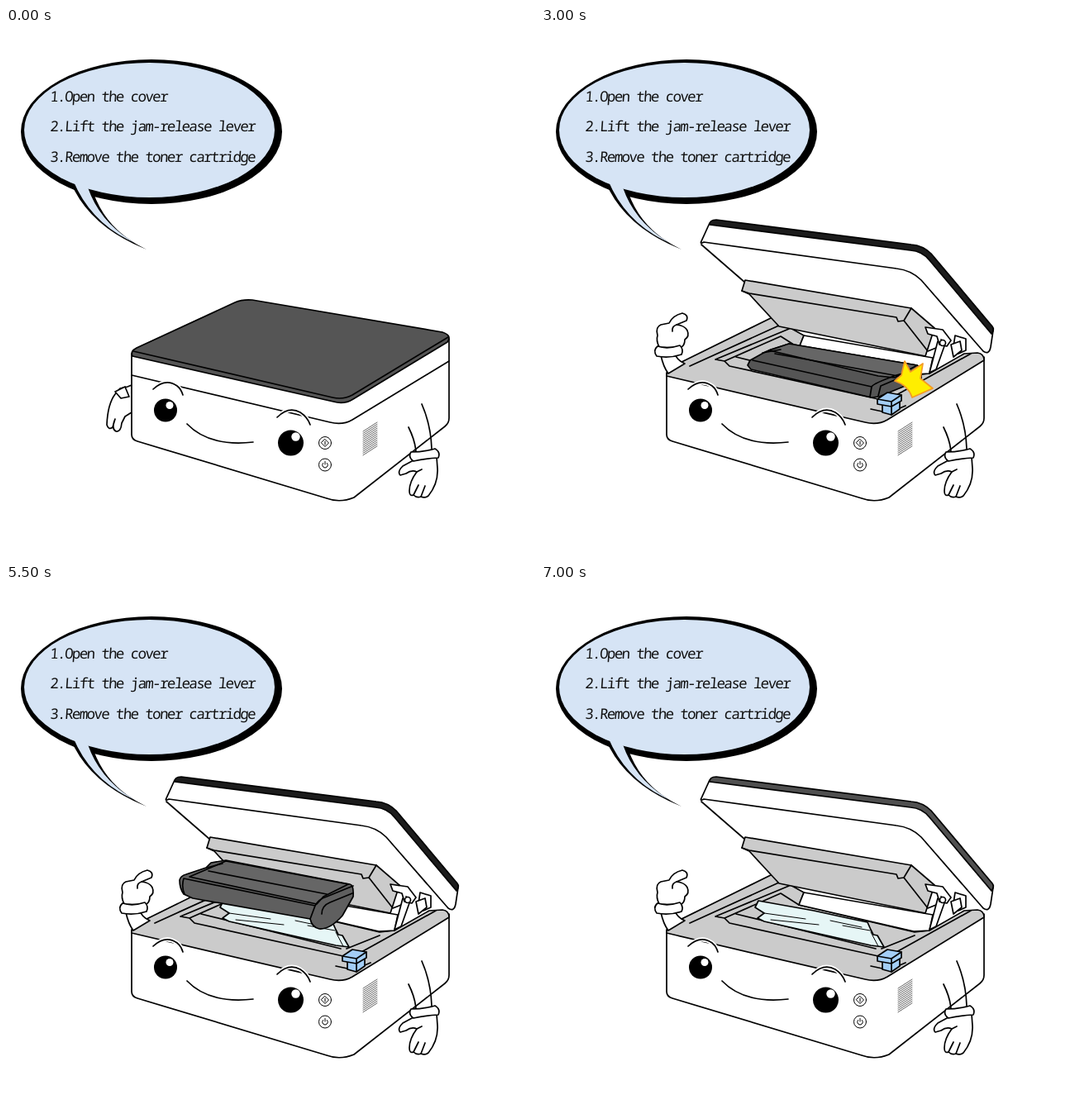
Recreate the animation shown at these times as an HTML page. Size 640 px wide and 640 px high, loop 9 s.

```html
<!DOCTYPE html>
<html lang="en">
<head>
<meta charset="utf-8">
<title>Remove the toner cartridge</title>
<style>
  html, body { margin: 0; width: 100%; height: 100%; overflow: hidden; background: #fff; }
  svg { display: block; width: 100vw; height: 100vh; }
  path, circle, ellipse { fill: none; stroke: #000; stroke-width: 1.7; stroke-linejoin: round; stroke-linecap: round; }
  .white { fill: #fff; }
  .grey { fill: #cbcbcb; }
  .dark { fill: #555; }
  .side { fill: #5f5f5f; }
  .top { fill: #666; }
  .blue { fill: #a3cef7; }
  .ink { fill: #000; stroke: none; }
  .sky { fill: #d6e4f5; stroke: none; }
  .paper { fill: #e6f6f6; }
  .thin { stroke-width: 1; }
  .halo { stroke: #fff; stroke-width: 5; }
  .glint { fill: #fff; stroke: none; }
  #vents { stroke: #555; stroke-width: .9; }
  text { font: 300 17.5px "Noto Sans Mono", "DejaVu Sans Mono", monospace; letter-spacing: -1.65px; fill: #111; }
</style>
</head>
<body>
<svg viewBox="0 0 640 640">
  <g id="bubble">
    <ellipse class="ink" cx="176" cy="125.5" rx="158" ry="87.5"/>
    <path class="ink" d="M78 186Q100 240 170 268Q122 245 106 200Z"/>
    <ellipse class="sky" cx="173.5" cy="123.5" rx="151.5" ry="81.5"/>
    <path class="sky" d="M81 184Q103 237 156 260Q114 236 99 193Z"/>
    <g id="steps"></g>
  </g>

  <g id="closed">
    <path class="white" d="M152 432L147 434L138 436L132 443Q123 455 122 480Q124 487 129 483L132 473Q127 485 133 488Q139 489 140 478L144 470L152 465Z"/>
    <path class="white" d="M132 440L144 434L149 446L139 448Z"/>
    <path class="white" d="M152 394V492Q152 498 159 500L388 569Q404 575 421 568L531 482Q536 478 536 472V376L416 449L400 450Z"/>
    <path class="dark" d="M153 397Q150 391 158 387L277 332Q286 328 298 329L528 368Q540 372 534 380L420 449Q409 456 396 452Z"/>
    <path d="M154 391L395 447Q408 450 419 444L535 374"/>
    <path d="M152 420L392 477Q407 481 419 474L536 403"/>
  </g>

  <g id="open">
    <path class="white" d="M152 417V492Q152 498 159 500L388 569Q404 575 421 568L531 482Q536 478 536 472V398L416 474Z"/>
    <path class="grey" d="M152 421Q151 414 160 409L282 349L300 362L318 372L312 387L452 420L470 418L512 394L528 393Q536 394 536 402L419 474Q407 481 392 477Z"/>
    <path d="M180 409L290 359M211 401L300 364M211 401L222 403L228 409L408 449M222 403L290 373L312 387M236 398L405 440M412 440L452 424M430 444L520 394"/>
    <path class="white" d="M318 372L312 387L451 419L470 418L474 399Z"/>

    <path class="white" d="M204 236L194 258Q192 262 197 259L430 291Q448 293 460 305L535 391Q542 396 544 386L547 366L468 274L450 267Z"/>
    <path id="strip" d="M204 238Q204 232 212 232L448 262Q462 263 472 273L546 361Q549 365 545 370L470 281Q461 270 447 269Z"/>
    <path d="M194 262L247 308"/>
    <path class="grey" d="M247 305L448 339L476 363L465 397L288 361L252 322L243 318Z"/>
    <path d="M243 318L252 321L430 350L432 355L439 354L468 391L478 387M439 354L448 339"/>

    <path class="white" d="M480 379L470 417L478 413L489 382Z"/>
    <path class="white" d="M465 362L486 365L496 378L491 385L482 383L479 373L468 370Z"/>
    <path class="white" d="M499 385L501 372L514 376V390L505 394Z"/>
    <path class="white" d="M496 383L507 379L509 390L499 398Z"/>
    <path d="M484 377L489 380"/>
    <circle class="white" cx="486" cy="381" r="3.5"/>

    <path class="white" d="M145 396Q148 410 154 418L174 406Q164 402 161 392"/>
    <path class="white" d="M143 386Q139 378 141 372Q138 362 145 359L155 357Q159 348 171 345Q179 347 176 354L164 359Q174 360 177 366Q180 373 174 377Q174 385 168 387Z"/>
    <path d="M164 359Q158 361 159 367"/>
    <path class="white" d="M141 385Q153 389 168 384Q173 389 170 395Q155 400 140 397Q135 390 141 385Z"/>
  </g>

  <g id="face">
    <path class="halo" d="M178 437Q193 423 207 433Q212 437 214 444"/>
    <path d="M178 437Q193 423 207 433Q212 437 214 444"/>
    <path class="halo" d="M328 471Q342 457 356 465Q365 471 368 480"/>
    <path d="M328 471Q342 457 356 465Q365 471 368 480"/>
    <circle class="ink" cx="193" cy="462.5" r="14"/>
    <circle class="glint" cx="198" cy="456.5" r="4.5"/>
    <circle class="ink" cx="344.5" cy="502" r="15.5"/>
    <circle class="glint" cx="350.5" cy="494.5" r="5.2"/>
    <path d="M219 479Q246 507 299 501"/>
    <g id="buttons">
      <circle class="thin" cx="386" cy="502" r="7.5"/>
      <path class="thin" d="M386 497.5L390.5 502L386 506.5L381.5 502ZM386 500V504"/>
      <circle class="thin" cx="386" cy="528.5" r="7.5"/>
      <path class="thin" d="M383.5 526.5A3.3 3.3 0 1 0 388.5 526.5M386 524.5V528"/>
    </g>
    <path id="vents"/>
  </g>

  <g id="right-arm">
    <path d="M503 455Q514 480 515 509M487 483Q495 499 496 513"/>
    <path class="white" d="M493 523L480 530Q473 537 477 541L484 539Q491 534 497 537Q488 549 488 560Q488 567 493 565Q497 569 502 567Q507 569 511 566Q523 551 522 533L521 519Z"/>
    <path d="M499 553L493 565M507 554L502 567M497 537L503 534"/>
    <path class="white" d="M490 513Q505 513 519 509Q526 513 523 520Q507 521 493 524Q486 519 490 513Z"/>
  </g>

  <g id="seated">
    <path class="dark" d="M250 408L253 402L271 392L278 389L300 382L455 408L460 412V425L409 446L400 447L254 413Z"/>
    <path class="top" d="M276 390L300 382L455 408L428 423L408 421Z"/>
    <path d="M283 394L432 421M256 402L400 434M268 393L290 389M398 446L400 434Q402 430 430 420L460 412M408 445L411 433L437 422"/>
  </g>

  <path id="burst" d="M440 403L447 416L462 406L459 424L474 436L449 447Q444 432 428 427L436 420Z" style="fill:#fe0;stroke:#f59a23"/>

  <g id="sheet">
    <path class="paper" d="M263 382L330 394L371 403L395 408L399 417L402 423L407 424L415 438L399 436L270 407L262 403L270 397L259 390Z"/>
    <path class="thin" d="M270 397L320 404M278 405L336 411M350 406L388 414M365 412L398 418M399 420L408 437"/>
  </g>

  <g id="cartridge">
    <path class="side" d="M168 330Q169 325 176 323L200 315L206 309L224 306L374 335Q379 336 378 350L365 373Q350 390 337 389Q328 387 326 377L184 352L173 347Q168 340 168 330Z"/>
    <path class="top" d="M180 326L224 307L372 335L342 350L334 359Z"/>
    <path d="M203 319L346 347M173 328L332 361M201 315L220 310M326 377L332 361Q336 353 346 350L378 337M340 371Q340 361 350 357L377 346M173 328Q170 338 174 347"/>
  </g>

  <g id="lever-down">
    <path class="blue" d="M408 460L420 452L437 455L425 465Z"/>
    <path d="M400 460L408 462L425 467L441 457M412 462L424 463L435 455"/>
  </g>
  <g id="lever-up">
    <path d="M399 461L413 464M434 460L441 457"/>
    <path class="blue" d="M413 454V465L424 468L434 461V450Z"/>
    <path class="blue" d="M407 449L419 441L436 444V451L424 458L407 455Z"/>
    <path d="M407 449L424 452L436 444M424 452V468"/>
  </g>
</svg>
<script>
  const LOOP = 9000;
  const $ = id => document.getElementById(id);

  const lines = ["1.Open the cover", "2.Lift the jam-release lever", "3.Remove the toner cartridge"];
  lines.forEach((line, i) => {
    const el = document.createElementNS("http://www.w3.org/2000/svg", "text");
    el.setAttribute("transform", `translate(53 ${89 + i * 36.3}) skewX(-4)`);
    el.textContent = line;
    $("steps").append(el);
  });

  $("vents").setAttribute("d", Array.from({ length: 13 }, (_, i) =>
    `M432 ${(488 + i * 2.4).toFixed(1)}l17 -11`).join(""));

  // Visible spans in ms: [from, to]
  const spans = {
    "closed": [[0, 1000]],
    "open": [[1000, LOOP]],
    "lever-down": [[1000, 2000]],
    "lever-up": [[2000, LOOP]],
    "burst": [[2000, 2500], [3000, 3500], [4000, 4500]],
    "seated": [[1000, 5000]],
    "sheet": [[5000, LOOP]],
    "cartridge": [[5000, 7000]]
  };
  // Cartridge positions: [from, x, y]
  const lift = [[5000, 61, 49], [5500, 42, 27], [6000, 0, 0], [6500, -65, -29]];

  function draw(t) {
    for (const id in spans) {
      const on = spans[id].some(([a, b]) => t >= a && t < b);
      $(id).style.display = on ? "" : "none";
    }
    const [, x, y] = lift.filter(s => t >= s[0]).pop() || lift[0];
    $("cartridge").setAttribute("transform", `translate(${x} ${y})`);
    $("strip").style.fill = t >= 2000 && t < 7000 ? "#1c1c1c" : "#505050";
  }

  const start = performance.now();
  function tick() {
    draw((performance.now() - start) % LOOP);
    requestAnimationFrame(tick);
  }
  tick();
</script>
</body>
</html>
```
